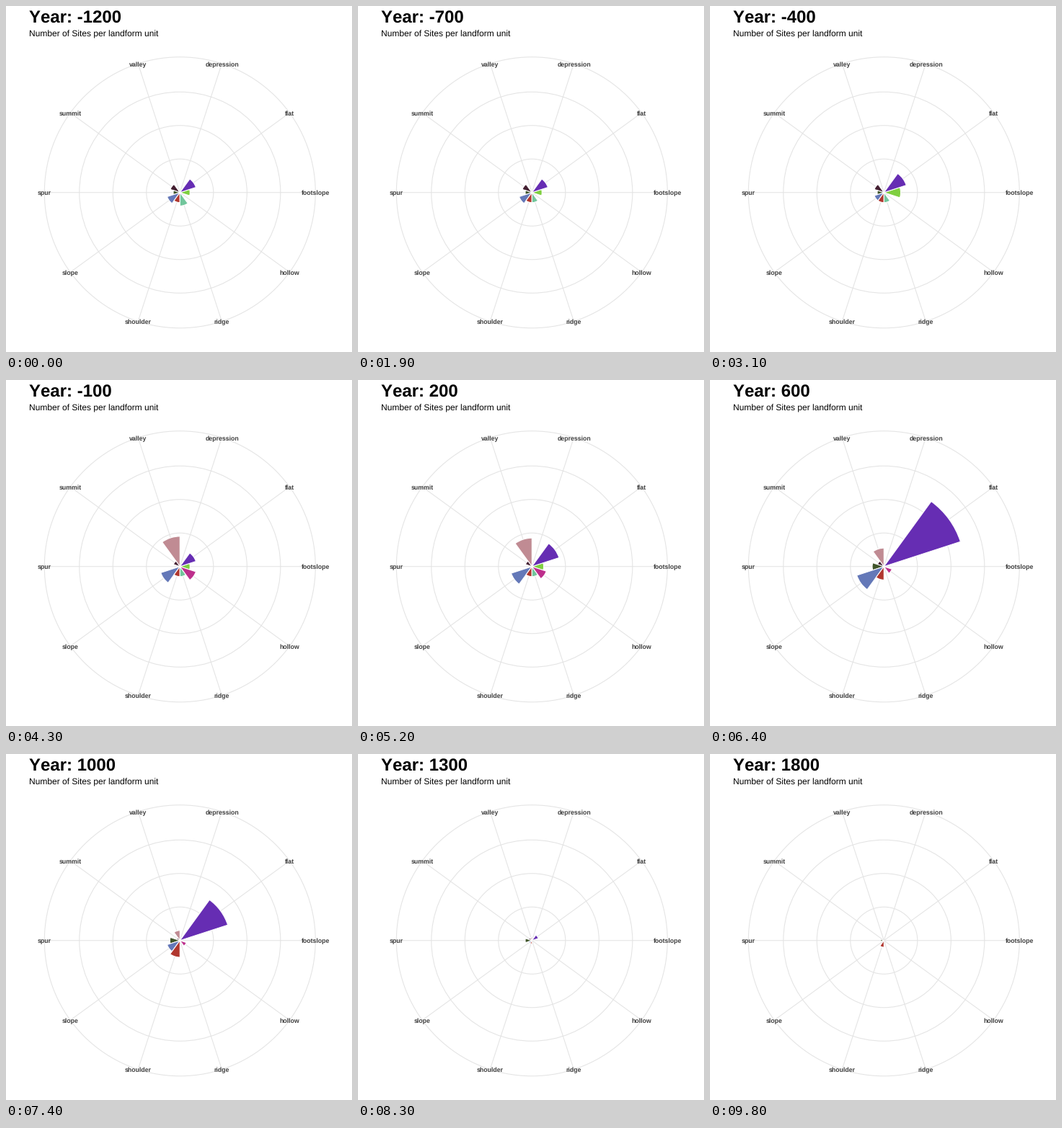
Animation, 480 px wide and 480 px high, one loop 10 s. Source, as a matplotlib script:

```python
import numpy as np
import matplotlib.pyplot as plt
from matplotlib.animation import FuncAnimation
from matplotlib.patches import Circle, Wedge

plt.rcParams.update({
    "font.family": "Liberation Sans",
    "text.hinting": "none",
    "text.kerning_factor": 6,   # plain advances, no kerning
})

SIZE = 480
CX, CY = 241.3, SIZE - 258.75
UNIT = 4.65          # pixels per site
RIM = 188
SECTOR = 36          # degrees per landform
LINE = 1.07

# Counter-clockwise from the right
COLORS = {
    "footslope": "#7fcf40", "flat": "#662db3", "depression": "#d8a13c",
    "valley": "#c08b93", "summit": "#442032", "spur": "#40552b",
    "slope": "#6478b8", "shoulder": "#b0362e", "ridge": "#72c69c",
    "hollow": "#bd2f8c",
}

# Site counts, given only where they change; None means no record
CHANGES = {
    -1200: dict(footslope=3, flat=5, summit=3, spur=2, slope=4, shoulder=3,
                ridge=4, hollow=0),
    -900: dict(shoulder=4, hollow=2),
    -800: dict(shoulder=3, ridge=3, hollow=0),
    -600: dict(footslope=5, flat=7, slope=3),
    -300: dict(footslope=4, flat=6, slope=7),
    -200: dict(flat=9, slope=12, valley=5, hollow=3),
    -100: dict(footslope=3, flat=5, valley=9, summit=2, spur=2, slope=6, hollow=5),
    300: dict(footslope=4, flat=12, valley=8, spur=None, slope=7, hollow=4),
    400: dict(footslope=5, flat=27, valley=7, spur=4, slope=8, ridge=4, hollow=3),
    600: dict(flat=36, slope=12, shoulder=4),
    700: dict(footslope=None, flat=12, valley=4, spur=3, slope=5, ridge=None, hollow=2),
    1000: dict(flat=15, valley=3, summit=1, slope=4, shoulder=5),
    1100: dict(flat=11, valley=2, slope=3, shoulder=4, hollow=1),
    1200: dict(flat=8, valley=1, spur=2, slope=2, shoulder=3, hollow=0),
    1300: dict(flat=2, slope=1, shoulder=1),
    1500: dict(spur=1, slope=0, shoulder=2),
    1700: dict(flat=0, valley=0, summit=0),
}
SPUR_GAP = -200      # the spur record restarts after this year

YEARS = [y for y in range(-1200, 1801, 100) if y != 0]
STARTS = [0, *range(3, 48, 4), *range(50, 99, 3)]
FRAMES = 100


def build_states():
    states, now = [], {}
    for year in YEARS:
        now = {**now, **CHANGES.get(year, {})}
        states.append({k: v for k, v in now.items() if v is not None})
    return states


STATES = build_states()


def matched(a, b):
    """Landforms that carry over from one state to the next."""
    keys = STATES[a].keys() & STATES[b].keys()
    return keys - {"spur"} if YEARS[a] == SPUR_GAP else keys


def counts_at(i):
    """Hold each state, with one halfway step; unmatched bars pop in and out."""
    k = int(np.searchsorted(STARTS, i, side="right")) - 1
    state = STATES[k]
    keys = set(state)
    if k + 1 < len(STATES):
        left = STARTS[k + 1] - i
        if left == 1:
            nxt = STATES[k + 1]
            return k, {n: (state[n] + nxt[n]) / 2 for n in matched(k, k + 1)}
        if left == 2:
            keys &= matched(k, k + 1)
    if k and i == STARTS[k]:
        keys &= matched(k - 1, k)
    return k, {n: state[n] for n in keys}


fig = plt.figure(figsize=(SIZE / 72, SIZE / 72), dpi=72, facecolor="white")
ax = fig.add_axes([0, 0, 1, 1])
ax.set(xlim=(0, SIZE), ylim=(0, SIZE))
ax.axis("off")

GRID = dict(color="#e4e4e4", lw=LINE, zorder=1, snap=False)
for r in (10 * UNIT, 20 * UNIT, 30 * UNIT, RIM):
    ax.add_patch(Circle((CX, CY), r, fill=False, **GRID))

wedges = {}
for n, (name, color) in enumerate(COLORS.items()):
    mid = n * SECTOR
    dx, dy = RIM * np.cos(np.radians(mid)), RIM * np.sin(np.radians(mid))
    ax.plot([CX, CX + dx], [CY, CY + dy], **GRID)
    ax.text(CX + dx + 0.2, CY + dy - 3.72, name, size=8.8, weight="bold",
            color="#404040", ha="center", va="baseline", zorder=3)
    wedges[name] = ax.add_patch(
        Wedge((CX, CY), 1, mid - SECTOR / 2, mid + SECTOR / 2, fc=color,
              ec="white", lw=LINE, zorder=2, snap=False, visible=False))

title = ax.text(32, SIZE - 24, "", size=24, weight="bold", va="baseline")
ax.text(32, SIZE - 43, "Number of Sites per landform unit", size=12, va="baseline")


def draw(i):
    k, counts = counts_at(i)
    title.set_text(f"Year: {YEARS[k]}")
    for name, wedge in wedges.items():
        count = counts.get(name, 0)
        wedge.set_visible(count > 0)
        if count:
            wedge.set_radius(count * UNIT)
    return [title, *wedges.values()]


anim = FuncAnimation(fig, draw, frames=FRAMES, interval=100,
                     repeat=True, repeat_delay=0, blit=False)
plt.show()
```
